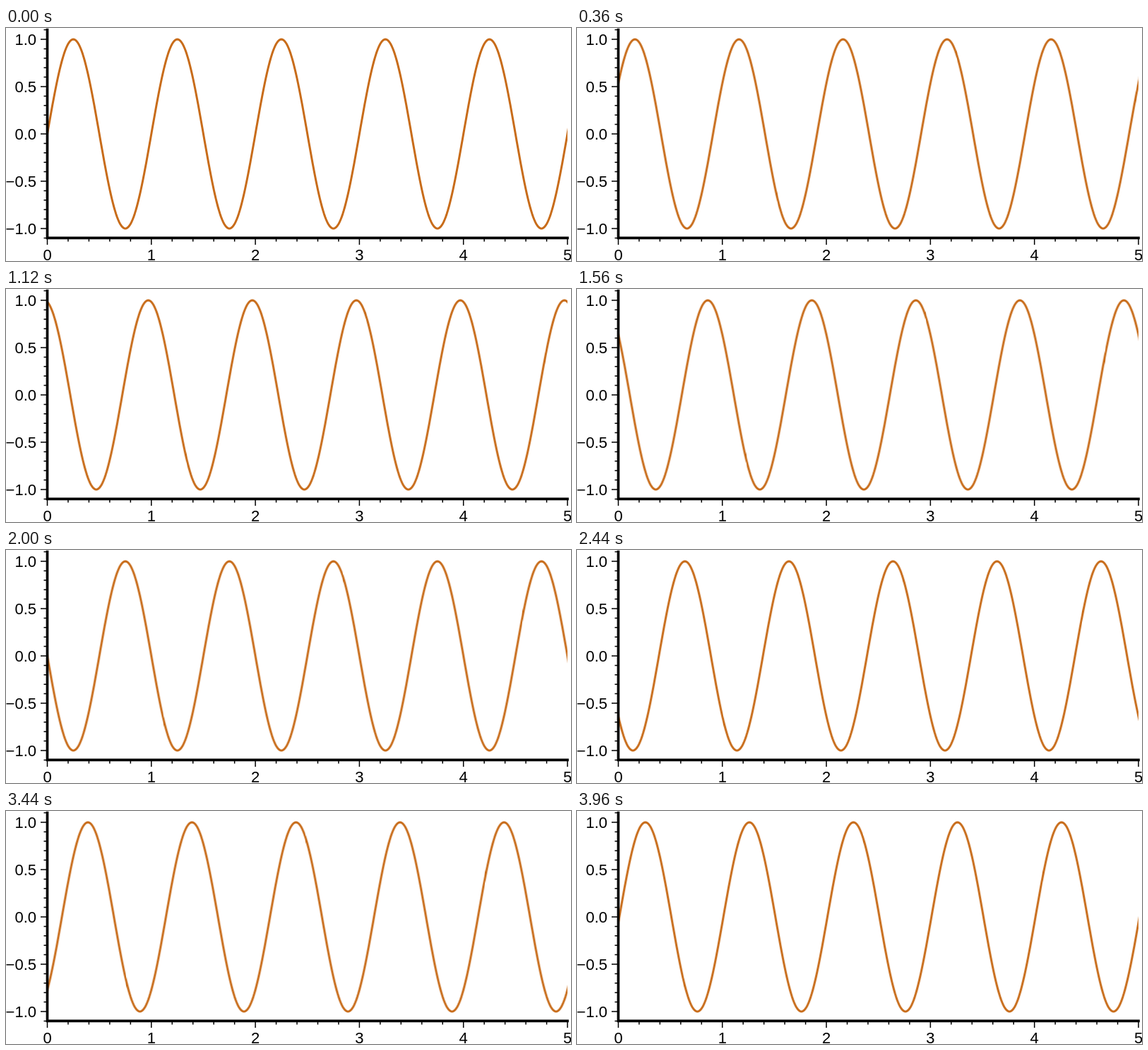
An HTML page that plays this animation: 800 px wide and 330 px high, repeating every 4 s.

```html
<!DOCTYPE html>
<html lang="en">
<head>
<meta charset="utf-8">
<title>Travelling sine wave</title>
<style>
  html, body { margin: 0; width: 100%; height: 100%; overflow: hidden; background: #fff; }
  svg { display: block; width: 800px; height: 330px; }
  text { font: 22px "Liberation Sans", Arial, sans-serif; fill: #000; }
  #wave { fill: none; stroke: #c86c1a; stroke-width: 3; stroke-linejoin: round; }
  #axes { fill: none; stroke: #000; stroke-width: 3.7; stroke-linecap: square; }
  #ticks { fill: none; stroke: #000; stroke-width: 1.5; }
</style>
</head>
<body>
<svg viewBox="0 0 800 330">
  <clipPath id="plot"><rect x="58.5" y="0" width="736.5" height="298"/></clipPath>
  <g clip-path="url(#plot)"><path id="wave"/></g>
  <path id="ticks"/>
  <path id="axes"/>
  <g id="labels"></g>
</svg>
<script>
  const UNIT = 147.3, AMPLITUDE = 134;
  const px = x => 58.5 + x * UNIT;
  const py = y => 150 - y * AMPLITUDE;
  const byId = id => document.getElementById(id);

  function addLabel(text, x, y, anchor) {
    const label = document.createElementNS("http://www.w3.org/2000/svg", "text");
    label.textContent = text;
    label.setAttribute("x", x);
    label.setAttribute("y", y);
    label.setAttribute("text-anchor", anchor);
    byId("labels").append(label);
  }

  let ticks = "";
  for (let i = 0; i <= 25; i++) {
    const major = i % 5 === 0;
    ticks += `M${px(i / 5)} 297.4V${major ? 307 : 302.5}`;
    if (major) addLabel(i / 5, px(i / 5), 329, "middle");
  }
  for (let i = -11; i <= 11; i++) {
    const major = i % 5 === 0;
    ticks += `M58.5 ${py(i / 10)}H${major ? 49 : 53.5}`;
    if (major) addLabel((i / 10).toFixed(1).replace("-", "\u2212"), 43, py(i / 10) + 8, "end");
  }
  byId("ticks").setAttribute("d", ticks);
  byId("axes").setAttribute("d", `M58.5 ${py(1.1)}V${py(-1.1)}H${px(5)}`);

  // One extra period on the right feeds the scroll.
  const points = Array.from({ length: 621 }, (_, i) => {
    const x = (i - 10) / 100;
    return `${px(x).toFixed(2)} ${py(Math.sin(2 * Math.PI * x)).toFixed(2)}`;
  });
  byId("wave").setAttribute("d", "M" + points.join("L"));

  byId("wave").animate(
    [{ transform: "translateX(0px)" }, { transform: `translateX(${-UNIT}px)` }],
    { duration: 4000, iterations: Infinity, easing: "steps(100, end)" }
  );
</script>
</body>
</html>
```
